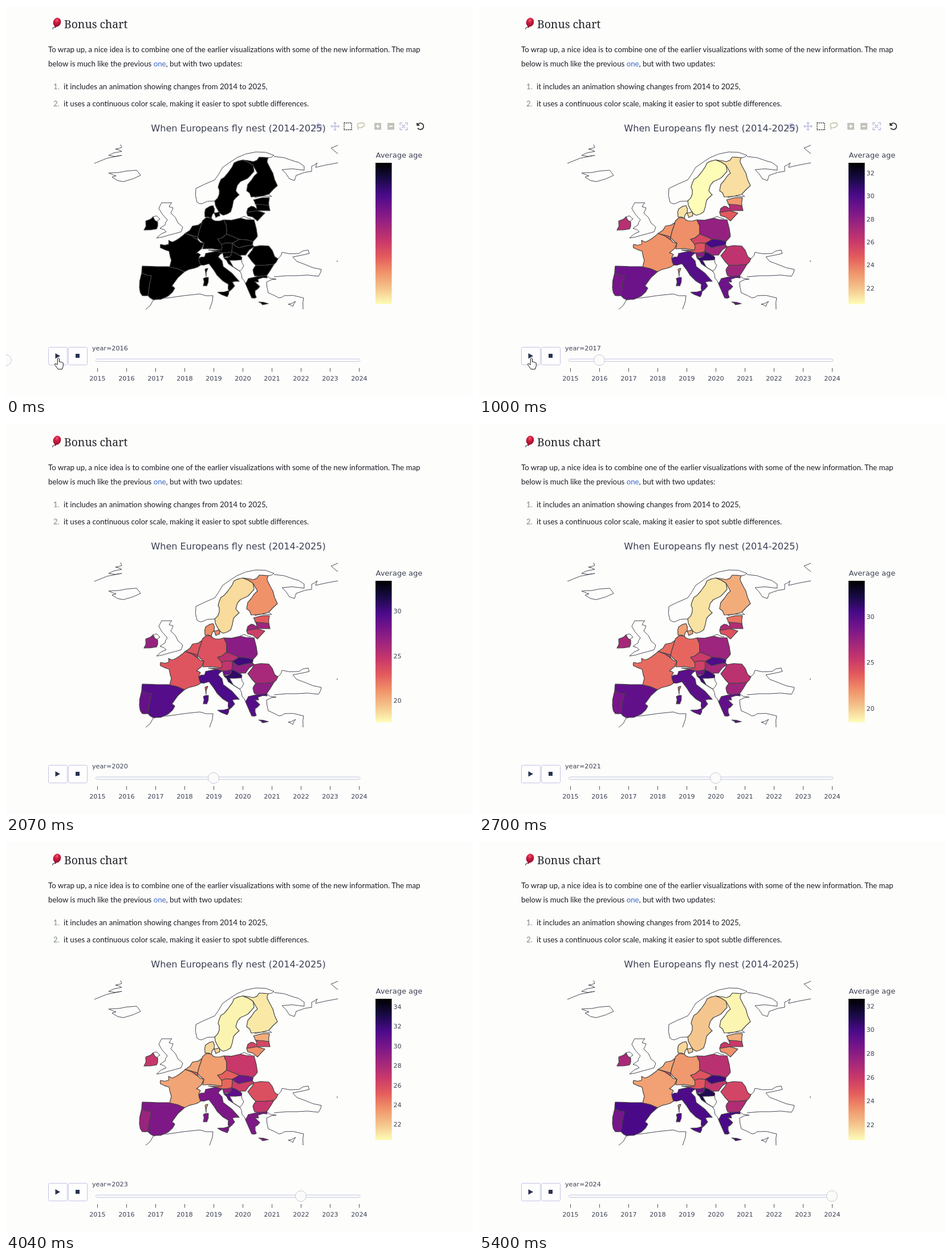
Write an HTML page that moves like this. It is 819x684 px and loops after 5430 ms.

```html
<!DOCTYPE html>
<html lang="en">
<head>
<meta charset="utf-8">
<title>Bonus chart</title>
<style>
html, body { margin: 0; width: 100%; height: 100%; overflow: hidden; background: #fdfdfc; }
svg { display: block; }
.body { font: 13.25px Lato, sans-serif; fill: #1c1c24; }
.num { fill: #7d8a86; }
.plot { font-family: "DejaVu Sans", Verdana, sans-serif; fill: #3c4052; }
.small { font-size: 11.2px; }
#land path { stroke: #444; stroke-width: 1.2; stroke-linejoin: round; }
#coast { fill: none; stroke: #4a4a55; stroke-linejoin: round; }
#bar { fill: none; stroke: #c6c8e2; stroke-width: 1.8; }
.box { fill: #fefefe; stroke: #c3c3e6; }
</style>
</head>
<body>
<svg width="819" height="684" viewBox="0 0 819 684">
  <defs>
    <clipPath id="view"><rect x="155" y="243" width="427" height="289"/></clipPath>
    <linearGradient id="scale" x1="0" y1="1" x2="0" y2="0"></linearGradient>
    <radialGradient id="red" cx=".4" cy=".3" r=".75">
      <stop offset="0" stop-color="#f0607a"/><stop offset=".35" stop-color="#d21f3f"/><stop offset="1" stop-color="#8c1030"/>
    </radialGradient>
  </defs>

  <path d="M87 37Q81 37 82 41" fill="none" stroke="#445" stroke-width="1.2"/>
  <ellipse cx="89.5" cy="28.5" rx="6.8" ry="8" transform="rotate(18 89.5 28.5)" fill="url(#red)"/>
  <path d="M85 35l4 1-3 3z" fill="#a01535"/>
  <text x="102" y="39" font-family="Noto Serif, serif" font-size="19.4" fill="#222228">Bonus chart</text>
  <g class="body">
    <text x="74" y="81">To wrap up, a nice idea is to combine one of the earlier visualizations with some of the new information. The map</text>
    <text x="74" y="106">below is much like the previous <tspan fill="#3c68c4">one</tspan>, but with two updates:</text>
    <text x="83" y="146" class="num">1.</text>
    <text x="101" y="146">it includes an animation showing changes from 2014 to 2025,</text>
    <text x="83" y="176" class="num">2.</text>
    <text x="101" y="176">it uses a continuous color scale, making it easier to spot subtle differences.</text>
  </g>

  <g id="bar">
    <path d="M541 208h3l2-3h4l2 3h3v8h-14z" fill="#d3d3ea" stroke="none"/><circle cx="548" cy="212" r="2.5" fill="#fff" stroke="none"/>
    <path d="M570 211h14M577 204v14M572 209l-2 2 2 2M582 209l2 2-2 2M575 206l2-2 2 2M575 216l2 2 2-2"/>
    <rect x="593" y="205" width="13" height="12" stroke="#62625a" stroke-dasharray="2 1.3"/>
    <path d="M618 213q-5-7 4-8 9 0 6 5-5 5-10 3-2 0 0 4" stroke="#cdcbb0"/>
    <path d="M646 205h12v12h-12zM669 205h12v12h-12z" fill="#c4c3bb" stroke="none"/>
    <path d="M649 211h6M652 208v6M672 211h6" stroke="#fff"/>
    <path d="M691 209v-4h4M700 205h4v4M704 213v4h-4M695 217h-4v-4M694 208l6 6M700 208l-6 6"/>
    <path d="M722 208a5.6 5.6 0 1 1 0 6M721 205v4h4" stroke="#333"/>
  </g>
  <text class="plot" x="407.5" y="220" font-size="16.1" text-anchor="middle">When Europeans fly nest (2014-2025)</text>

  <g clip-path="url(#view)">
    <path id="coast"/>
    <g id="land"></g>
  </g>

  <text class="plot" x="648.5" y="266" font-size="13">Average age</text>
  <rect x="648" y="275" width="28.5" height="248" fill="url(#scale)"/>
  <g id="marks" class="plot" font-size="11"></g>

  <rect class="box" x="74.5" y="598.5" width="33" height="31" rx="2"/>
  <rect class="box" x="109.5" y="598.5" width="33" height="31" rx="2"/>
  <path d="M86.5 609v9.5l8.5-4.8zM122 610h7v7h-7z" fill="#2a3350"/>
  <text id="label" class="plot small" x="151" y="604"></text>
  <rect x="157.5" y="619" width="463.5" height="4.5" rx="2.2" fill="#fafaf8" stroke="#c6cae4"/>
  <g id="years" class="plot small" text-anchor="middle"></g>
  <circle id="knob" cy="621" r="9.5" fill="#fbfbf9" stroke="#c6c9dc"/>
  <path id="hand" d="M90.5 618.5q1.800-2.400 3 .3v5.500q1.300-1.200 2.500.4 1.400-.8 2.300.6 2-.4 2 1.700v4.500l-2 5.500h-7l-5.500-7.500q-1.200-2.600 1.600-2.200l2.600 2z" fill="#fff" stroke="#111"/>
</svg>
<script>
const LOOP = 5430, TOP = 275, BOTTOM = 523, STEP = 51, LAST = 9;
const colors = ['fdfdb8', 'f4c58c', 'f0946a', 'e45c5c', 'c9386a', 'a0267c', '76158a', '480a88', '180a44', '000000']
  .map(h => [0, 2, 4].map(i => parseInt(h.substr(i, 2), 16)));

// years since 2015, with the ends of the color scale
const range = [[0, 19.6, 33], [1, 20.6, 32.9], [4, 17.6, 33.4], [7, 20.4, 34.8], [9, 20.7, 32.6]];

// first age, last age, rough outline
const lands = [
  [16, 22, '367,349 366,342 374,330 372,318 377,304 389,293 400,275 415,270 433,279 435,290 424,302 411,308 403,324 409,331 399,341 394,361 381,367 374,362'],
  [21.4, 20.9, '415,270 434,273 444,265 460,266 458,274 468,293 476,315 461,330 430,335 422,324 430,306 441,293 433,279'],
  [21.2, 21.6, '350,356 363,350 365,362 360,372 349,370/365,363 374,361 375,368 368,371'],
  [23.5, 23.2, '351,371 360,372 367,377 382,375 387,400 371,409 382,421 378,428 345,426 347,416 336,405 342,385'],
  [23.4, 22.9, '342,385 336,405 314,399 327,386 343,380'],
  [24.5, 25.4, '314,399 336,405 337,411 320,404'],
  [23.4, 23, '314,399 337,411 347,416 334,433 341,436 338,443 345,452 330,460 313,466 287,458 290,446 286,430 271,424 271,418 285,418 285,411 292,414 303,408/349,462 354,460 351,474'],
  [29, 29.9, '239,456 285,457 313,466 291,491 296,495 284,509 258,515 249,508 255,473 238,468'],
  [28.8, 28.6, '238,468 255,473 249,508 239,508 234,494'],
  [29.7, 29.8, '338,443 348,440 350,434 369,430 380,433 372,440 381,457 409,483 397,484 401,491 391,501 390,488 370,472 356,452 341,454/371,502 391,499 388,510/346,478 355,476 352,491 346,491'],
  [25, 24.9, '355,428 378,428 378,418 397,416 396,431 380,433 369,430'],
  [25.5, 25, '371,409 387,400 409,409 397,416 378,418'],
  [28, 26.5, '382,375 411,372 435,375 441,404 433,413 409,409 387,400'],
  [30.2, 30.2, '409,409 433,413 432,419 408,424 397,416'],
  [27.6, 26.2, '397,416 408,424 432,419 435,422 420,437 408,438 396,431'],
  [28, 29, '380,433 396,431 392,440 382,441'],
  [30.6, 31, '382,442 392,440 396,431 413,440 413,445 392,446 410,465 390,452'],
  [26.5, 25.5, '435,422 461,421 471,439 477,443 470,453 438,455 424,438'],
  [27.5, 26.8, '438,455 470,453 462,466 457,473 436,473 433,463'],
  [29, 29.9, '420,487 425,478 457,473 458,477 442,479 443,484 436,483 445,492 437,499 439,511 431,512/443,519 460,522 450,524'],
  [23.3, 22.6, '434,340 462,336 461,350 437,347'],
  [26.8, 26, '424,355 430,351 440,356 438,348 461,350 463,359 422,362'],
  [25, 23.4, '422,362 440,359 454,363 441,377 424,368'],
  [26.6, 27, '245,377 258,370 266,379 264,391 242,393']
];

const coasts = [
  '155,276 203,262 180,262 203,255 192,251 203,248 201,243',
  '180,293 198,292 229,288 236,297 206,308 186,300 193,298 180,293',
  '273,345 291,345 286,352 293,354 289,363 302,381 310,388 307,396 285,402 264,407 281,396 270,390 279,384 283,375 268,355 273,345',
  '257,370 264,368 270,374 265,378',
  '366,342 343,347 335,344 333,320 366,305 380,283 405,266 438,256 470,262 460,266',
  '470,264 505,272 523,281 523,288 484,287 497,303 506,306 509,297 536,290 536,281 546,275 543,283 582,275',
  '582,259 570,249 582,244',
  '461,330 466,334 436,336',
  '411,372 418,369 430,373',
  '477,443 484,432 514,434 530,428 532,434 503,440 521,452 553,462 548,474 510,473 470,475',
  '457,473 474,479 457,484 460,503 479,512 488,508 522,512 521,532',
  '495,523 508,518 503,527 495,523',
  '245,532 258,516 284,512 340,505 363,508 357,532',
  '413,445 417,455 410,465 414,478 420,487',
  '581,446 581,449'
];

const $ = id => document.getElementById(id);
function add(parent, tag, attrs, text) {
  const el = document.createElementNS('http://www.w3.org/2000/svg', tag);
  for (const k in attrs) el.setAttribute(k, attrs[k]);
  if (text !== undefined) el.textContent = text;
  return parent.appendChild(el);
}
const mix = (a, b, f) => a + (b - a) * f;
const clamp = f => Math.max(0, Math.min(1, f));
const rgb = c => `rgb(${c.map(Math.round)})`;

// Jagged midpoints seeded by place, so neighbours share the same border
function noise(x, y) {
  const n = Math.sin(x * 12.9898 + y * 78.233) * 43758.5453;
  return n - Math.floor(n) - .5;
}
function rough([x, y], [u, v]) {
  const size = Math.min(5, Math.hypot(u - x, v - y) * .25);
  const mx = (x + u) / 2, my = (y + v) / 2;
  return `L${mx + noise(mx, my) * size} ${my + noise(my, mx) * size}L${u} ${v}`;
}
function outline(text, closed) {
  return text.split('/').map(part => {
    const pts = part.split(' ').map(p => p.split(',').map(Number));
    if (closed) pts.push(pts[0]);
    return 'M' + pts[0] + pts.slice(1).map((p, i) => rough(pts[i], p)).join('');
  }).join('');
}

function shade(f) {
  const p = clamp(f) * (colors.length - 1), i = Math.min(colors.length - 2, Math.floor(p));
  return rgb(colors[i].map((v, k) => mix(v, colors[i + 1][k], p - i)));
}

function limits(year) {
  const i = Math.max(1, range.findIndex(r => r[0] >= year));
  const [a, b] = [range[i - 1], range[i]], f = (year - a[0]) / (b[0] - a[0]);
  return [mix(a[1], b[1], f), mix(a[2], b[2], f)];
}

colors.forEach((c, i) => add($('scale'), 'stop', { offset: i / (colors.length - 1), 'stop-color': rgb(c) }));
const shapes = lands.map(land => add($('land'), 'path', { d: outline(land[2], true) }));
$('coast').setAttribute('d', coasts.map(c => outline(c)).join(''));
for (let i = 0; i <= LAST; i++) {
  const x = 160.5 + STEP * i;
  add($('years'), 'path', { d: `M${x} 635v6.5`, stroke: '#555' });
  add($('years'), 'text', { x, y: 657 }, 2015 + i);
}

function drawYear(year) {
  const [low, high] = limits(year), span = high - low;
  shapes.forEach((s, i) => {
    const age = mix(lands[i][0], lands[i][1], year / LAST);
    s.setAttribute('fill', shade((age - low) / span));
  });
  $('knob').setAttribute('cx', 160 + STEP * year);
  $('marks').textContent = '';
  const step = span > 15 ? 5 : 2;
  for (let v = Math.ceil(low / step) * step; v < high; v += step)
    add($('marks'), 'text', { x: 679.5, y: mix(BOTTOM, TOP, (v - low) / span) + 4 }, v);
}

// The label keeps an even pace; the map redraws later and stalls once, before 2023
const labelYear = t => Math.min(LAST, 1 + Math.floor(t / 510));
function mapYear(t) {
  const run = s => Math.floor((s - 155) / 435);
  return Math.max(Math.min(7, run(t)), Math.min(LAST, run(t - 480)));
}

let shown = -1;
function tick() {
  const t = performance.now() % LOOP, year = mapYear(t);
  if (year !== shown) drawYear(shown = year);
  $('label').textContent = 'year=' + (2015 + labelYear(t));
  $('hand').setAttribute('visibility', t < 1500 ? 'visible' : 'hidden');
  $('bar').setAttribute('opacity', clamp((1800 - t) / 300));
  requestAnimationFrame(tick);
}
tick();
</script>
</body>
</html>
```
